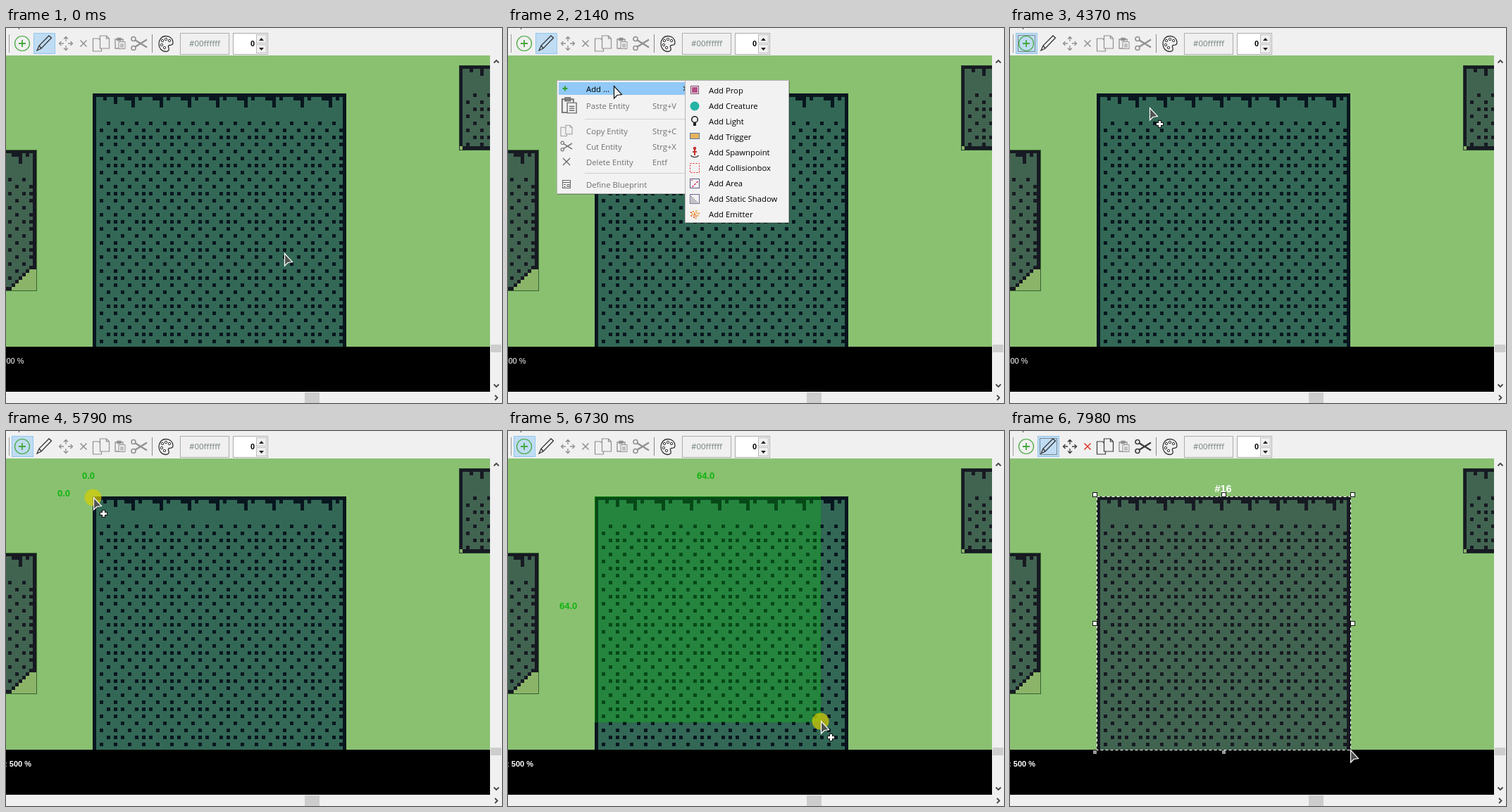
Animation, 704 px wide and 533 px high, one loop 8000 ms. Source, as an HTML page with a canvas:

```html
<!DOCTYPE html>
<html lang="en">
<head>
<meta charset="utf-8">
<title>Level editor</title>
<style>
  html, body { margin: 0; width: 100%; height: 100%; overflow: hidden; background: #f0f0f0; }
  canvas { display: block; }
</style>
</head>
<body>
<canvas width="704" height="533"></canvas>
<script>
const ctx = document.querySelector('canvas').getContext('2d');
const LOOP = 8000, CELL = 5, STEP = 75;
const UI = '"Open Sans", sans-serif', ARIAL = '"Liberation Sans", Arial, sans-serif';
const BLOCK = { x: 123, y: 93, size: 72 };
const TIME = { menu: 1590, submenu: 2100, place: 3900, press: 5560, drag: 5790, done: 7980 };

// Pointer path: time, x, y
const PATH = [
  [35, 395, 320], [420, 250, 178], [740, 82, 95], [890, 87, 79], [910, 87, 79], [1040, 97, 67],
  [1130, 97, 67], [1210, 98, 65], [1480, 69, 74], [1830, 69, 74], [2140, 150, 82], [2380, 150, 82],
  [2650, 254, 88], [2850, 292, 118], [3000, 321, 143], [3210, 322, 172], [3440, 323, 191],
  [4150, 323, 191], [4370, 198, 113], [4620, 140, 94], [4840, 123, 88], [4950, 123, 88],
  [5170, 123, 93], [5310, 123, 93], [5390, 124, 94], [5720, 124, 94], [6340, 378, 338],
  [6570, 419, 388], [6970, 481, 447], [7130, 481, 447], [7200, 482, 448], [7280, 482, 448],
  [7440, 483, 451], [7910, 483, 451], [7980, 483, 453]
];

function pointerAt(t) {
  const i = PATH.findIndex(p => p[0] > t);
  if (i < 1) return (i ? PATH[PATH.length - 1] : PATH[0]).slice(1);
  const a = PATH[i - 1], b = PATH[i], span = b[0] - a[0];
  const n = Math.max(1, Math.round(span / STEP));
  const u = Math.floor((t - a[0]) / span * n) / n;
  return [1, 2].map(k => Math.round(a[k] + (b[k] - a[k]) * u));
}

function rect(x, y, w, h, color) {
  ctx.fillStyle = color;
  ctx.fillRect(x, y, w, h);
}
function frame(x, y, w, h, color, dash = []) {
  ctx.setLineDash(dash);
  ctx.strokeStyle = color;
  ctx.lineWidth = 1;
  ctx.strokeRect(x + .5, y + .5, w - 1, h - 1);
  ctx.setLineDash([]);
}
function path(d, stroke, width = 1, fill, x = 0, y = 0) {
  ctx.save();
  ctx.translate(x, y);
  const p = new Path2D(d);
  if (fill) { ctx.fillStyle = fill; ctx.fill(p); }
  if (stroke) { ctx.strokeStyle = stroke; ctx.lineWidth = width; ctx.stroke(p); }
  ctx.restore();
}
function circle(x, y, r, stroke, fill, width = 1) {
  ctx.beginPath();
  ctx.arc(x, y, r, 0, Math.PI * 2);
  if (fill) { ctx.fillStyle = fill; ctx.fill(); }
  if (stroke) { ctx.strokeStyle = stroke; ctx.lineWidth = width; ctx.stroke(); }
}
function text(s, x, y, color, font, align = 'left') {
  ctx.font = font;
  ctx.fillStyle = color;
  ctx.textAlign = align;
  ctx.fillText(s, x, y);
}

// Tile pattern, in cells
function isDark(c, r) {
  if (r === 0 || c === 0 || c === 71) return true;
  const k = c > 8 ? c % 8 : -1;
  if (r === 1) return c === 3 || c === 6 || [1, 2, 3, 5].includes(k);
  if (r < 4) return k === 3 || (r === 2 && c === 6);
  if (r < 8 || r % 2) return false;
  return c % 4 === r % 4 || (r % 8 === 4 && c % 8 === 6);
}

function block(x, y, rows, muted, shape = isDark) {
  const [base, ink] = muted ? ['#416451', '#171a22'] : ['#336856', '#08161f'];
  rect(x, y, 360, rows * CELL, base);
  for (let r = 0; r < rows; r++) for (let c = 0; c < 72; c++) {
    const px = x + c * CELL;
    if (px < -4 || px > 687) continue;
    const cell = shape(c, r);
    if (cell) rect(px, y + r * CELL, CELL, CELL, cell === 'cut' ? '#8cb469' : ink);
  }
}
function slopedBlock(c, r) {
  if (r > 33 && c + r > 103) return 'cut';
  return c + r === 103 || r === 39 || isDark(c, r);
}
function cornerBlock(c, r) {
  if (r === 23) return c ? true : 'cut';
  return isDark(c, r);
}

function scene(t) {
  rect(0, 39, 687, 414, '#8ac171');
  rect(0, 453, 687, 64, '#000');
  block(-317, 173, 40, true, slopedBlock);
  frame(-317, 173, 361, 201, '#38642f');
  block(643, 53, 24, true, cornerBlock);
  frame(643, 53, 361, 121, '#273f30');
  block(BLOCK.x, BLOCK.y, BLOCK.size, t >= TIME.done);
  if (t < TIME.drag) text('00 %', 25.5, 477, '#fff', '11px ' + ARIAL, 'right');
  else text(': 500 %', 36, 477, '#fff', 'bold 11px ' + ARIAL, 'right');
}

function dragBox(mx, my) {
  const { x, y } = BLOCK, w = Math.round((mx - x) / CELL), h = Math.round((my - y) / CELL);
  const pw = w * CELL, ph = h * CELL, font = 'bold 13px ' + ARIAL;
  rect(x, y, pw, ph, 'rgba(0,212,0,.27)');
  frame(x, y, pw + 1, ph + 1, 'rgba(0,180,0,.5)');
  text(w.toFixed(1), Math.round(x + pw / 2) - 15, 68, '#10b410', font);
  text(h.toFixed(1), 73, Math.round(y + ph / 2), '#10b410', font);
}

function selection() {
  text('#16', 302.5, 87, '#fff', 'bold 14.5px ' + ARIAL, 'center');
  frame(123, 93, 361, 361, '#111');
  frame(123, 93, 361, 361, '#fff', [4, 3]);
  for (const x of [120, 303, 486]) for (const y of [90, 273, 456]) {
    if ((x === 303 && y === 273) || (x === 486 && y === 456)) continue;
    if (y === 456) { rect(x - 2, y - 2, 5, 5, '#999'); continue; }
    rect(x - 3, y - 3, 7, 7, '#fff');
    frame(x - 3, y - 3, 7, 7, '#111');
  }
}

function scrollbars() {
  rect(687, 39, 17, 494, '#f0f0f0');
  rect(0, 517, 704, 16, '#f0f0f0');
  rect(688, 450, 15, 11, '#cdcdcd');
  rect(424, 518, 21, 15, '#cdcdcd');
  path('M692.5 49.5l3.500 -3.500l3.500 3.500M692.500 506.500l3.500 3.500l3.500 -3.500M694 522l3.500 3.500l-3.500 3.500', '#444', 1.8);
}

// Small icons, centred on x, y
const pages = (x, y, color, k = 1) => {
  ctx.save();
  ctx.translate(x, y);
  ctx.scale(k, k);
  path('M-11.500 -7h8l4 4v14h-12z', color, 1.2, '#f0f0f0');
  path('M-1.500 -11h9l4 4v14h-13z M7.500 -11v4h4', color, 1.2, '#f0f0f0');
  ctx.restore();
};
const clipboard = (x, y, color, k = 1) => {
  ctx.save();
  ctx.translate(x, y);
  ctx.scale(k, k);
  path('M-2 7h-5v-13h11v3M-4 -7.500h5v3h-5z', color, 1.3);
  path('M-2 -2.500h9v10h-9zM0 1h5M0 3h5M0 5h5', color, 1, '#f0f0f0');
  ctx.restore();
};
const scissors = (x, y, color, k = 1) => {
  ctx.save();
  ctx.translate(x, y);
  ctx.scale(k, k);
  path('M-6 -5L11 5.500M-6 5L11 -5.500', color, 2.2);
  circle(-8, -6.5, 3, color, null, 1.6);
  circle(-8, 6.5, 3, color, null, 1.6);
  ctx.restore();
};
const cross = (x, y, r, color, width = 1.3) =>
  path(`M${-r} ${-r}L${r} ${r}M${r} ${-r}L${-r} ${r}`, color, width, null, x, y);

function toolButton(x, focused) {
  rect(x, 7, 31, 30, '#bfdcf3');
  frame(x, 7, 31, 30, '#93c7ef');
  if (focused) frame(x + 3, 10, 25, 24, '#333', [1, 1]);
}

function toolbar(t) {
  const placing = t >= TIME.place && t < TIME.done, done = t >= TIME.done;
  const grey = done ? '#3c3c3c' : '#909090';
  rect(0, 0, 704, 39, '#f0f0f0');
  rect(18, 0, 1, 2, '#444');
  rect(4, 9, 1, 26, '#999');
  rect(207, 9, 1, 26, '#888');
  toolButton(placing ? 8 : 39, done || (placing && t < TIME.press));
  circle(23, 22, 10.5, '#43a83c', null, 1.2);
  path('M18 22h10M23 17v10', '#43a83c', 1.8);
  path('M44 32l3 -7L61 11l3.500 3L50 29zM47 25l3 4', '#333', 1.3);
  path('M85 13v6M85 25v6M76 22h6M88 22h6M82 15.500l3 -3l3 3M82 28.500l3 3l3 -3M78.500 19l-3 3l3 3M91.500 19l3 3l-3 3', grey, 1.3);
  cross(110, 22, 4.5, done ? '#e03428' : '#909090', 1.5);
  pages(135, 22, grey);
  clipboard(162, 22, '#909090');
  scissors(189, 22, grey);
  path('M227 11.500c6 0 10 4 10 9c0 4 -3 4 -5 4c-2 0 -2 2 -1 4c1 3 -1 5 -4 5c-6 0 -10 -5 -10 -11c0 -6 4 -11 10 -11z', '#333', 1.3);
  for (const [x, y] of [[222, 18], [227, 16], [232, 18], [221, 24], [225, 28]]) circle(x, y, 1.7, '#333');
  frame(247, 7, 70, 31, '#adadad');
  text('#00ffffff', 260, 26, '#71807c', '11.5px ' + UI);
  rect(322, 7, 50, 31, '#fff');
  frame(322, 7, 50, 31, '#acacac');
  text('0', 353, 26, '#000', 'bold 11px ' + ARIAL, 'right');
  for (const y of [9, 23]) {
    rect(355, y, 15, 13, '#f0f0f0');
    frame(355, y, 15, 13, '#bbb');
  }
  path('M359 18h7l-3.500 -4zM359 28h7l-3.500 4z', null, 1, '#222');
}

const HOVER = '#91c9f7', DISABLED = '#707070', MENU_FONT = '11.3px ' + UI;

function panel(x, y, w, h) {
  rect(x + 1, y + 1, w, h, 'rgba(0,0,0,.25)');
  rect(x, y, w, h, '#f2f2f2');
  frame(x, y, w, h, '#b4b4b4');
}

function menu(mx) {
  panel(69, 74, 188, 162);
  if (mx > 72) rect(72, 77, 182, 18, HOVER);
  path('M77.500 86h7M81 82.500v7', '#2f9e2f', 2);
  path('M249 83l3 3l-3 3', '#333', 1.2);
  text('Add ...', 111, 91, '#000', MENU_FONT);
  const rows = [['Paste Entity', 'Strg+V', 115], ['Copy Entity', 'Strg+C', 151],
    ['Cut Entity', 'Strg+X', 173], ['Delete Entity', 'Entf', 195], ['Define Blueprint', '', 227]];
  for (const [name, key, y] of rows) {
    text(name, 111, y, DISABLED, MENU_FONT);
    text(key, 205, y, DISABLED, MENU_FONT);
  }
  rect(109, 129, 143, 1, '#cfcfcf');
  rect(109, 206, 143, 1, '#cfcfcf');
  clipboard(87, 110, '#707070', 1.45);
  pages(83, 146, '#888', .7);
  scissors(83, 168, '#777', .72);
  cross(83, 190, 5, '#666');
  frame(77, 216, 12, 12, '#666');
  path('M77 219.500h12M79 222.500h3M79 225.500h3M84 222.500h3v3h-3z', '#666');
}

function submenu(mx, my) {
  panel(251, 74, 148, 203);
  const hovered = mx > 252 ? Math.floor((my - 77) / 22) : -1;
  if (hovered >= 0) rect(254, 77 + hovered * 22, 143, 22, HOVER);
  ['Prop', 'Creature', 'Light', 'Trigger', 'Spawnpoint', 'Collisionbox', 'Area', 'Static Shadow', 'Emitter']
    .forEach((name, i) => text('Add ' + name, 285, 93 + i * 22, '#000', MENU_FONT));
  frame(259, 82, 12, 12, '#7a4a6a');
  rect(261, 84, 8, 8, '#b54f86');
  circle(265, 111, 6.5, null, '#25b3a6');
  circle(265, 130, 4.3, '#222', null, 1.6);
  rect(263, 134, 4, 5, '#222');
  rect(258, 149, 14, 9, '#e5b45c');
  frame(258, 149, 14, 9, '#5478a8');
  circle(265, 171, 2.2, null, '#c9302c');
  path('M265 173v8M262 176h6', '#c9302c', 2);
  path('M259.500 181c2 3.500 9 3.500 11 0', '#333', 1.3);
  frame(258, 192, 14, 14, '#e02020', [2, 2]);
  frame(258, 214, 14, 14, '#5a5a80');
  for (let i = 0; i < 7; i++) rect(260 + i * 7 % 10, 216 + i * 3 % 10, 2, 1, '#d83070');
  frame(258, 236, 14, 14, '#6a6a90');
  for (let r = 0; r < 5; r++) for (let c = 0; c <= r; c++) rect(260 + c * 2, 239 + r * 2, 1, 1, '#334');
  for (let i = 0; i < 14; i++) {
    const a = i * 2.4, d = 1.7 * Math.sqrt(i);
    rect(264 + Math.cos(a) * d, 264 + Math.sin(a) * d, 2, 2, i % 3 ? '#f0a040' : '#e06a30');
  }
}

function pointer(t, x, y, inMenu) {
  const pressed = (t >= 1480 && t < 1680) || (t >= TIME.place && t < 3990) || (t >= TIME.press && t < TIME.done);
  if (pressed) circle(x - .5, y + .5, 12, null, 'rgba(215,205,0,.7)');
  const overBlock = x >= 118 && x < 483 && y >= 88;
  const light = !inMenu && (overBlock || y > 440);
  path('M.5 .5V18L5 13.500L11.500 12.500z', light ? '#fff' : '#111', 1.2, inMenu ? '#f4f4f4' : '#50534f', x, y);
  if (t >= TIME.place && t < TIME.done) {
    path('M-5.500 0h11M0 -5.500v11', '#111', 5, null, x + 14.5, y + 23.5);
    path('M-4.500 0h9M0 -4.500v9', '#fff', 3, null, x + 14.5, y + 23.5);
  }
}

function draw(now) {
  const t = now % LOOP, [x, y] = pointerAt(t);
  const menuOpen = t >= TIME.menu && t < TIME.place;
  scene(t);
  if (t >= TIME.done) selection();
  else if (t >= TIME.drag) dragBox(x, y);
  scrollbars();
  toolbar(t);
  if (menuOpen) menu(x);
  if (menuOpen && t >= TIME.submenu) submenu(x, y);
  pointer(t, x, y, menuOpen);
}

let start;
function tick(now) {
  start ??= now;
  draw(now - start);
  requestAnimationFrame(tick);
}
requestAnimationFrame(tick);
</script>
</body>
</html>
```
